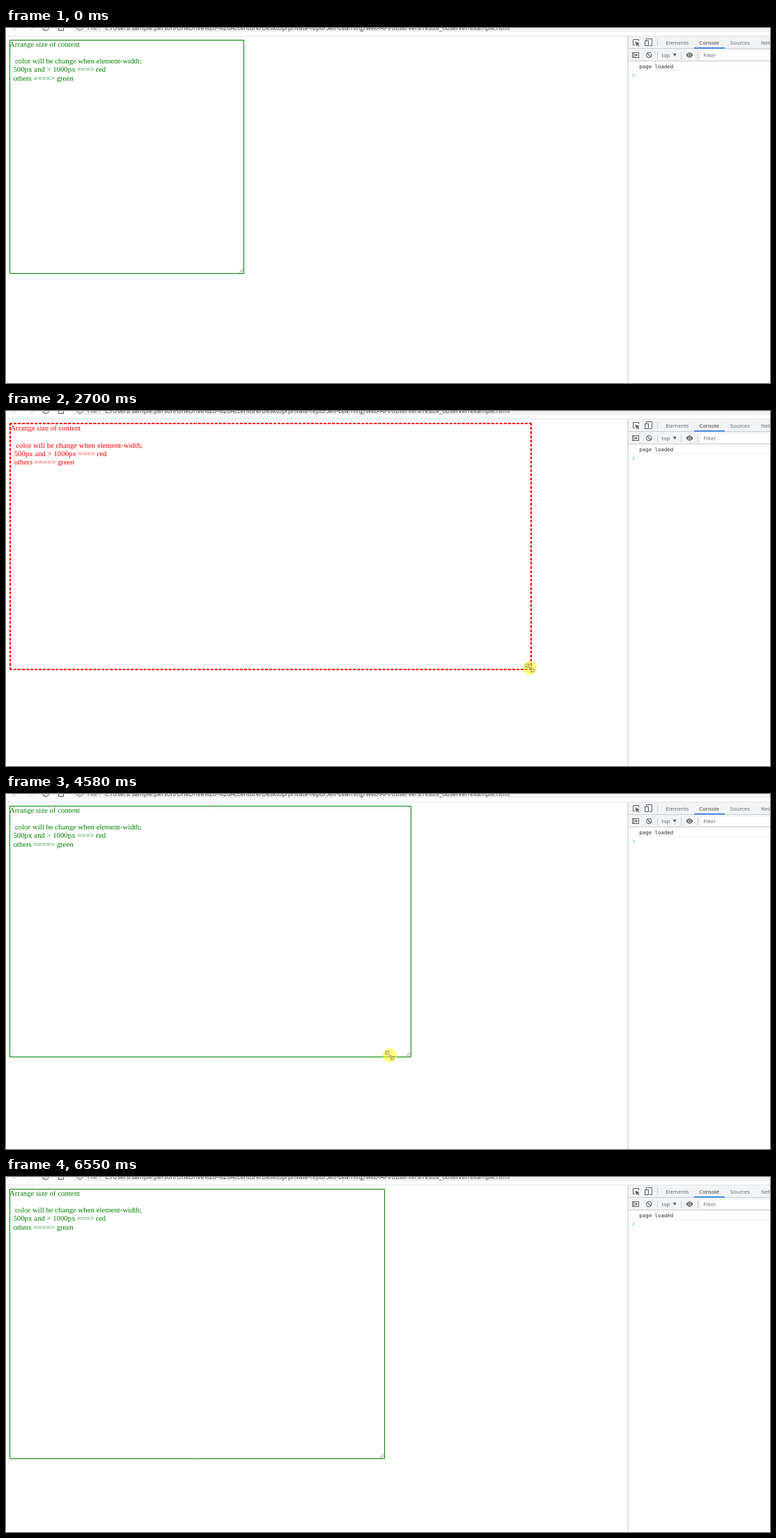
Animation, 1097 px wide and 511 px high, one loop 7210 ms. Source, as an HTML page with a canvas:

```html
<!DOCTYPE html>
<html lang="en">
<head>
<meta charset="utf-8">
<title>Resize observer</title>
<style>
  html, body { margin: 0; width: 100%; height: 100%; overflow: hidden; background: #fff; }
  canvas { display: block; }
</style>
</head>
<body>
<canvas id="stage" width="1097" height="511"></canvas>
<script>
const ctx = document.getElementById('stage').getContext('2d');
const LOOP = 7210, STEP = 70, LAG = 28;
const APPEAR = 180, GRAB = 1310, RELEASE = 6410, VANISH = 6550;
const UI = '"Open Sans", "Noto Sans", sans-serif';
const SERIF = '"Liberation Serif", "Noto Serif", serif';
const MONO = '"DejaVu Sans Mono", "Noto Sans Mono", monospace';
const INK = '#5f6368';
const BOX = { x: 5, y: 17, min: 342, max: 680 };

// The pointer is sampled every STEP, restarting at each of these times.
const BURSTS = [0, 180, 540, 1580, 2830, 6130];

const steady = k => k;
const accelerate = k => k ** 3;
const settle = k => Math.sin(k * Math.PI / 2);
// Half a cosine wave; skew below 1 moves the fast part earlier.
const swing = skew => k => (1 - Math.cos(Math.PI * k ** skew)) / 2;

// Turning points of the pointer, each with the easing that leads to it.
const MOVES = [
  { t: APPEAR, x: 848, y: 479 },
  { t: 320, x: 306, y: 263, ease: steady },
  { t: 530, x: 306, y: 263, ease: steady },
  { t: 750, x: 256, y: 287, ease: swing(1) },
  { t: 1170, x: 349, y: 352, ease: swing(1) },
  { t: 1240, x: 337, y: 351, ease: steady },
  { t: 1560, x: 337, y: 351, ease: steady },
  { t: 1860, x: 432, y: 344, ease: accelerate },
  { t: 2760, x: 754, y: 370, ease: settle },
  { t: 3380, x: 264, y: 361, ease: swing(0.9) },
  { t: 4220, x: 857, y: 374, ease: swing(1.1) },
  { t: 5150, x: 272, y: 378, ease: swing(0.7) },
  { t: 5730, x: 814, y: 392, ease: swing(1) },
  { t: RELEASE, x: 539, y: 403, ease: swing(1.9) },
  { t: 6480, x: 575, y: 438, ease: steady }
];

const clamp = (v, low, high) => Math.min(Math.max(v, low), high);

function pointerAt(time) {
  const t = clamp(time, MOVES[0].t, MOVES[MOVES.length - 1].t);
  const i = Math.max(1, MOVES.findIndex(move => move.t >= t));
  const a = MOVES[i - 1], b = MOVES[i];
  const k = b.ease((t - a.t) / (b.t - a.t));
  return { x: a.x + (b.x - a.x) * k, y: a.y + (b.y - a.y) * k };
}

function sampleTime(t) {
  const start = BURSTS.filter(s => s <= t).pop();
  return start + Math.floor((t - start) / STEP) * STEP;
}

function rect(x, y, w, h, color) {
  ctx.fillStyle = color;
  ctx.fillRect(x, y, w, h);
}

function text(str, x, y, size, color, family = UI) {
  ctx.font = `${size}px ${family}`;
  ctx.fillStyle = color;
  ctx.fillText(str, x, y);
}

function trace(points, close) {
  ctx.beginPath();
  points.forEach(([x, y]) => ctx.lineTo(x, y));
  if (close) ctx.closePath();
}

function line(points, color, width = 1, close = false) {
  trace(points, close);
  ctx.strokeStyle = color;
  ctx.lineWidth = width;
  ctx.stroke();
}

function shape(points, color) {
  trace(points, true);
  ctx.fillStyle = color;
  ctx.fill();
}

function disc(x, y, r, color) {
  ctx.beginPath();
  ctx.arc(x, y, r, 0, Math.PI * 2);
  ctx.fillStyle = color;
  ctx.fill();
}

function arc(x, y, r, width = 1, from = 0, to = Math.PI * 2) {
  ctx.beginPath();
  ctx.arc(x, y, r, from, to);
  ctx.strokeStyle = INK;
  ctx.lineWidth = width;
  ctx.stroke();
}

// A dashed side that starts and ends on a full dash.
function dashedSide(x1, y1, x2, y2, color) {
  const dash = 4, gap = 2;
  const length = Math.hypot(x2 - x1, y2 - y1);
  const count = Math.floor((length + gap) / (dash + gap));
  ctx.setLineDash([dash, (length - count * dash) / (count - 1)]);
  line([[x1, y1], [x2, y2]], color, 2);
  ctx.setLineDash([]);
}

function drawBrowserBar() {
  ctx.beginPath();
  ctx.roundRect(93, -14, 1040, 20, 10);
  ctx.fillStyle = '#f1f3f4';
  ctx.fill();
  line([[9, -1], [13, 3], [14, 3]], '#c4c6c9', 1.2);
  line([[40, -1], [36, 3], [35, 3]], '#d3d5d7', 1.2);
  arc(57, -1, 4.5, 1.2, 0.2, 2.9);
  line([[75.5, -2], [75.5, 3.4], [82.5, 3.4], [82.5, -2]], INK, 1.2);
  arc(106, -1, 4.3);
  rect(105.5, -2, 1, 3, INK);
  text('File', 117, 2.6, 8.9, INK);
  rect(134, 0, 1, 4, '#c8cacc');
  text('C:/Users/sample.person/OneDrive%20-%20Accenture/Desktop/private-repo/' +
    'Self-Learning/web-API/observers/resize_observer/example.html', 142, 2.6, 8.92, '#3c4043');
  rect(0, 11, 1097, 1, '#e1e3e5');
}

function drawToolbarIcons() {
  line([[903, 24.5], [900.5, 24.5], [900.5, 16.5], [908.5, 16.5], [908.5, 19]], INK);
  shape([[903.5, 19.5], [909.5, 22], [905, 26]], INK);
  line([[906, 22.5], [909, 26]], INK, 1.2);
  line([[919.5, 18], [919.5, 15.5], [927.5, 15.5], [927.5, 25.5], [924, 25.5]], INK);
  ctx.strokeRect(917.5, 18.5, 5, 7);

  ctx.strokeRect(899.5, 35.5, 9, 7);
  rect(901, 36, 1, 7, INK);
  shape([[903.5, 37], [907.5, 39], [903.5, 41]], INK);
  arc(923.3, 39, 3.7, 1.1);
  line([[920.8, 36.5], [925.8, 41.5]], INK, 1.1);
  shape([[957.7, 36.8], [962.7, 36.8], [960.2, 41.2]], INK);

  ctx.beginPath();
  ctx.moveTo(976.5, 39);
  ctx.quadraticCurveTo(981.5, 31.5, 986.5, 39);
  ctx.quadraticCurveTo(981.5, 46.5, 976.5, 39);
  ctx.fill();
  disc(981.5, 39, 2.3, '#f1f3f4');
  disc(981.5, 39, 1.4, INK);
}

function drawDevTools() {
  rect(893, 12, 204, 499, '#fff');
  rect(893, 12, 204, 35, '#f1f3f4');
  rect(893, 29, 204, 1, '#cacdd1');
  rect(893, 47, 204, 1, '#cacdd1');
  rect(892.5, 12, 1, 499, '#c3c5c8');
  drawToolbarIcons();
  rect(935, 15, 1, 11, '#cacdd1');
  [935, 969, 993].forEach(x => rect(x, 34, 1, 11, '#cacdd1'));

  text('Elements', 947.3, 23.6, 7.7, INK);
  text('Console', 995.3, 23.6, 7.7, '#333');
  text('Sources', 1039.8, 23.6, 7.7, INK);
  text('Network', 1084, 23.6, 7.7, INK);
  rect(988, 28, 44, 1.5, '#1a73e8');
  text('top', 941.5, 42, 7.7, INK);
  rect(998, 33, 99, 13, '#fff');
  text('Filter', 1001.5, 42.3, 7.7, INK);

  text('page loaded', 909.3, 58.2, 7.4, '#303030', MONO);
  rect(894, 61, 203, 1, '#f0f0f0');
  line([[899.8, 65.8], [902.2, 68], [899.8, 70.2]], '#56b4ee');
}

function drawBox(right, bottom) {
  const red = right < BOX.min || right > BOX.max;
  const color = red ? '#f00' : '#008000';
  const border = red ? 2 : 1;
  const half = border / 2;
  const l = BOX.x + half, t = BOX.y + half, r = right - half, b = bottom - half;

  if (red) {
    dashedSide(BOX.x, t, right, t, color);
    dashedSide(BOX.x, b, right, b, color);
    dashedSide(l, BOX.y, l, bottom, color);
    dashedSide(r, BOX.y, r, bottom, color);
  } else {
    line([[l, t], [r, t], [r, b], [l, b]], color, 1, true);
  }

  const gx = right - border - 0.5, gy = bottom - border - 0.5;
  [6, 2.5].forEach(size => line([[gx - size, gy], [gx, gy - size]], '#777', 0.9));

  const shift = red ? 1.3 : 0;
  [
    ['Arrange size of content', 0, 0],
    ['color will be change when element-width;', 8, 2],
    ['500px and > 1000px ===> red', 5.4, 3],
    ['others ====> green', 5.4, 4]
  ].forEach(([str, indent, row]) =>
    text(str, BOX.x + indent + shift, 27 + row * 12.15 + shift, 10.8, color, SERIF));
}

function drawPointer({ x, y }, resizing) {
  disc(x, y, 10.2, 'rgba(255, 255, 0, 0.5)');
  ctx.save();
  ctx.translate(x, y);
  if (resizing) {
    const head = [[-3.9, -2.6], [-5.8, -0.8], [-5.8, -5.8], [-0.8, -5.8], [-2.6, -3.9]];
    const arrow = [...head, ...head.map(([px, py]) => [-px, -py])];
    shape(arrow, 'rgba(255, 255, 255, 0.3)');
    line(arrow, '#77703c', 0.8, true);
  } else {
    const arrow = [[-3, -5.5], [-3, 4], [-0.8, 2], [0.8, 5.5], [2.3, 4.8], [0.8, 1.4], [3.8, 1.4]];
    shape(arrow, '#fff');
    line(arrow, '#4a4a30', 0.8, true);
  }
  ctx.restore();
}

function draw(t) {
  const now = sampleTime(t);
  const grip = pointerAt(clamp(now - LAG, GRAB, RELEASE));
  rect(0, 0, 1097, 511, '#fff');
  drawBrowserBar();
  drawBox(Math.round(grip.x + 5), Math.round(grip.y + 3));
  drawDevTools();
  if (t >= APPEAR && t < VANISH) {
    drawPointer(pointerAt(now), now >= GRAB && now <= RELEASE);
  }
}

const begin = performance.now();
function tick() {
  draw((performance.now() - begin) % LOOP);
  requestAnimationFrame(tick);
}
tick();
</script>
</body>
</html>
```
